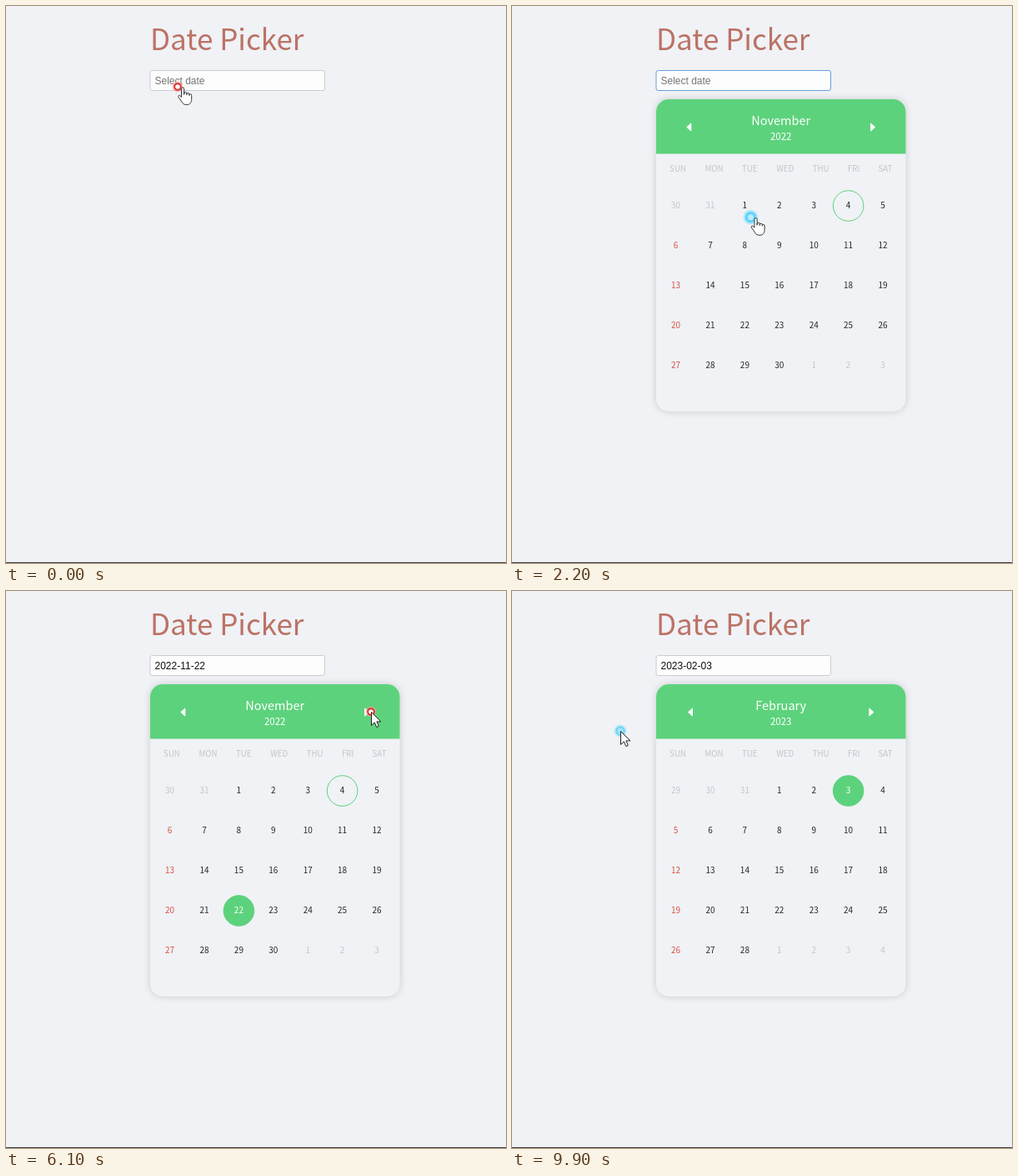
These frames come from a looping animation (600 px wide and 669 px high, 10000 ms). An HTML page:

```html
<!DOCTYPE html>
<html lang="en">
<head>
<meta charset="utf-8">
<title>Date Picker</title>
<style>
  html, body { margin: 0; width: 100%; height: 100%; overflow: hidden; background: #f0f2f6; }
  svg { display: block; width: 600px; height: 669px; }
  text { font-family: "Noto Sans CJK SC", "Noto Sans CJK JP", "Noto Sans CJK", "Open Sans", sans-serif; }
  .mid text, text.mid { text-anchor: middle; }
  #field { font: 12px "Liberation Sans", Arial, sans-serif; }
</style>
</head>
<body>
<svg viewBox="0 0 600 669">
  <defs>
    <filter id="soft" x="-10%" y="-10%" width="120%" height="120%"><feGaussianBlur stdDeviation="5"/></filter>
    <radialGradient id="halo">
      <stop offset=".35" stop-color="#2cc4fa"/>
      <stop offset=".65" stop-color="#4fd0fb" stop-opacity=".75"/>
      <stop offset="1" stop-color="#8be2fd" stop-opacity="0"/>
    </radialGradient>
  </defs>
  <rect width="600" height="669" fill="#f0f2f6"/>
  <rect y="668" width="600" height="1" fill="#3a3b3d"/>
  <text x="173" y="53" font-size="35" fill="#bc7265">Date Picker</text>
  <rect id="box" x="173" y="77.5" width="209.5" height="24" rx="2.5" fill="#fdfdfe"/>
  <text id="field" x="178.5" y="93.5"></text>

  <g id="calendar">
    <rect x="173" y="112" width="299.5" height="375" rx="15" fill="#000" opacity=".16" filter="url(#soft)"/>
    <rect x="173" y="112" width="299.5" height="375" rx="15" fill="#f0f2f6"/>
    <path d="M173 177.5V127a15 15 0 0 1 15-15H457.500a15 15 0 0 1 15 15V177.500Z" fill="#5dd27c"/>
    <g fill="#fff" stroke="#fff" stroke-linejoin="round">
      <path id="prev" d="M2.500-4.500V4.500L-2.500 0Z"/>
      <path id="next" d="M-2.500-4.500V4.500L2.500 0Z"/>
    </g>
    <text id="month" class="mid" x="322.7" y="143" font-size="14.5" fill="#fff"></text>
    <text id="year" class="mid" x="322.7" y="161" font-size="11.5" fill="#fff"></text>
    <g id="weekdays" class="mid" font-size="9.7" fill="#c3c4c7"></g>
    <g id="days" class="mid" font-size="10"></g>
  </g>

  <circle id="glow" fill="url(#halo)"/>
  <circle id="ring" r="4" stroke-width="2"/>
  <g id="pointer">
    <path id="arrow" d="M.5.500V16.500L4.300 12.900 6.800 18.600 9.400 17.500 6.900 11.900H11.900Z" fill="#fff" stroke="#222" stroke-linejoin="round"/>
    <g id="busy" fill="none">
      <circle r="5.700" stroke="#2b95e9" stroke-width="4"/>
      <circle r="5.700" stroke="#55b8f6" stroke-width="3" stroke-dasharray="9 27"/>
    </g>
    <path id="hand" d="M-1.500 1.500a1.600 1.600 0 0 1 3.200 0V8.500V7a1.600 1.600 0 0 1 3.200.2V8.800V7.800a1.500 1.500 0 0 1 3 .3V9.500V9a1.400 1.400 0 0 1 2.800.3V14.500C10.700 17.500 8.500 20.500 5.800 20.500H3.500C.8 20.500-1 17.500-2.500 15L-5 11.500C-6 9.800-4 8.700-2.800 10L-1.500 11.500Z" fill="#fff" stroke="#333" stroke-linejoin="round"/>
  </g>
</svg>
<script>
const LOOP = 10000, STEP = 100, GREEN = "#5dd27c";
const OPEN_AT = 300, BUSY_UNTIL = 5200, HIT_RADIUS = 17, HOVER_LAG = 100;
const $ = id => document.getElementById(id);

// time, x, y
const path = [
  [0, 206, 97], [300, 206, 97], [1300, 379, 388], [1700, 379, 388],
  [2300, 279, 243], [2700, 279, 243], [3000, 326, 290], [3100, 341, 308],
  [3500, 400, 376], [4100, 400, 376], [4600, 238, 327], [4900, 238, 327],
  [5200, 278, 376], [5500, 278, 376], [5900, 438, 145], [7300, 438, 145],
  [7700, 403, 234], [8100, 403, 234], [8500, 340, 196], [9000, 340, 196],
  [9900, 130, 168]
];
const clicks = [0, 1400, 2500, 3700, 5300, 6100, 6600, 7100, 7900];
const months = [
  { from: 0, name: "November", year: 2022, index: 10, inset: 0 },
  { from: 6200, name: "December", year: 2022, index: 11, inset: .2 },
  { from: 6700, name: "January", year: 2023, index: 0, inset: 2.7 },
  { from: 7200, name: "February", year: 2023, index: 1, inset: 1.7 }
];
const picks = [
  { from: 0, value: "" },
  { from: 2500, value: "2022-11-01" },
  { from: 3700, value: "2022-11-25" },
  { from: 5300, value: "2022-11-22" },
  { from: 7900, value: "2023-02-03" }
];

const latest = (list, t) => list.filter(item => item.from <= t).pop();
const pad = n => String(n).padStart(2, "0");

function add(parent, tag, attrs) {
  const node = document.createElementNS("http://www.w3.org/2000/svg", tag);
  set(node, attrs);
  return parent.appendChild(node);
}
function set(node, attrs) {
  for (const key in attrs) node.setAttribute(key, attrs[key]);
}
function show(node, visible) {
  node.style.display = visible ? "" : "none";
}

const weekdayX = [199, 242.5, 285.3, 327.7, 370.7, 410.2, 448];
["SUN", "MON", "TUE", "WED", "THU", "FRI", "SAT"].forEach((name, i) => {
  add($("weekdays"), "text", { x: weekdayX[i], y: 198.7 }).textContent = name;
});

const cells = Array.from({ length: 35 }, (_, i) => {
  const x = 196.6 + 41.4 * (i % 7), y = 240 + 48 * Math.floor(i / 7);
  return {
    x, y,
    disc: add($("days"), "circle", { cx: x, cy: y, r: 18.3 }),
    label: add($("days"), "text", { x, y: y + 3 })
  };
});

function position(t) {
  const i = path.findIndex(p => p[0] >= t);
  if (i < 0) return path[path.length - 1].slice(1);
  if (i === 0) return path[0].slice(1);
  const [t0, x0, y0] = path[i - 1], [t1, x1, y1] = path[i];
  const u = (t - t0) / (t1 - t0), k = u * u * (3 - 2 * u);
  return [x0 + (x1 - x0) * k, y0 + (y1 - y0) * k];
}
function cellAt([x, y]) {
  return cells.findIndex(c => Math.hypot(c.x - x, c.y - y) < HIT_RADIUS);
}

function drawCalendar(t, value) {
  const { name, year, index, inset } = latest(months, t);
  $("month").textContent = name;
  $("year").textContent = year;
  set($("prev"), { transform: `translate(${212.3 + inset} 145.500)` });
  set($("next"), { transform: `translate(${433.1 - inset} 145.500)` });

  const offset = new Date(year, index, 1).getDay();
  const hovered = t > OPEN_AT ? cellAt(position(Math.max(0, t - HOVER_LAG))) : -1;
  cells.forEach(({ disc, label }, i) => {
    const date = new Date(year, index, i - offset + 1);
    const day = date.getDate(), inside = date.getMonth() === index;
    const iso = `${year}-${pad(index + 1)}-${pad(day)}`;
    const filled = inside && (iso === value || i === hovered);
    const today = iso === "2022-11-04" && inside;
    label.textContent = day;
    set(label, { fill: filled ? "#fff" : !inside ? "#c5c6c9" : i % 7 ? "#242526" : "#d9503f" });
    set(disc, { fill: filled ? GREEN : "none", stroke: filled || today ? GREEN : "none" });
  });
}

function drawPointer(t) {
  const [x, y] = position(t);
  const red = clicks.some(c => t >= c && t < c + 200);
  const overDay = t > OPEN_AT && cellAt([x, y]) >= 0;
  const hand = t <= OPEN_AT || overDay;
  const busy = !hand && t < BUSY_UNTIL;
  const pulse = (1 + Math.cos((t - 3100) / 1080 * 2 * Math.PI)) / 2;

  set($("ring"), {
    cx: x, cy: y, r: red ? 3.8 : 4.5,
    fill: red ? "#fff" : "#e9f9ff", "fill-opacity": red ? 1 : .25 + .65 * pulse,
    stroke: red ? "#e02f2c" : "#4fcdf8", "stroke-opacity": red ? 1 : .5 + .4 * pulse
  });
  set($("glow"), {
    cx: x, cy: y, r: red ? 6.5 : 7 + 4 * pulse,
    fill: red ? "#f3a9a5" : "url(#halo)", opacity: red ? .6 : .55 + .45 * pulse
  });

  const [dx, dy] = hand ? [6, 1] : busy ? [.5, 8] : [0, 0];
  set($("pointer"), { transform: `translate(${x + dx} ${y + dy})` });
  show($("hand"), hand);
  show($("arrow"), !hand);
  show($("busy"), busy);
  set($("busy"), { transform: `translate(14.500 0) rotate(${t * .36 % 360})` });
}

function draw(time) {
  const t = Math.floor(time % LOOP / STEP) * STEP;
  const { value } = latest(picks, t);
  const focused = t >= 100 && !value;
  set($("box"), { stroke: focused ? "#66a0dc" : "#cbccd0" });
  $("field").textContent = value || "Select date";
  set($("field"), { fill: value ? "#111" : "#757575" });
  show($("calendar"), t >= OPEN_AT);
  drawCalendar(t, value);
  drawPointer(t);
}

const start = performance.now();
function tick() {
  draw(performance.now() - start);
  requestAnimationFrame(tick);
}
tick();
</script>
</body>
</html>
```
